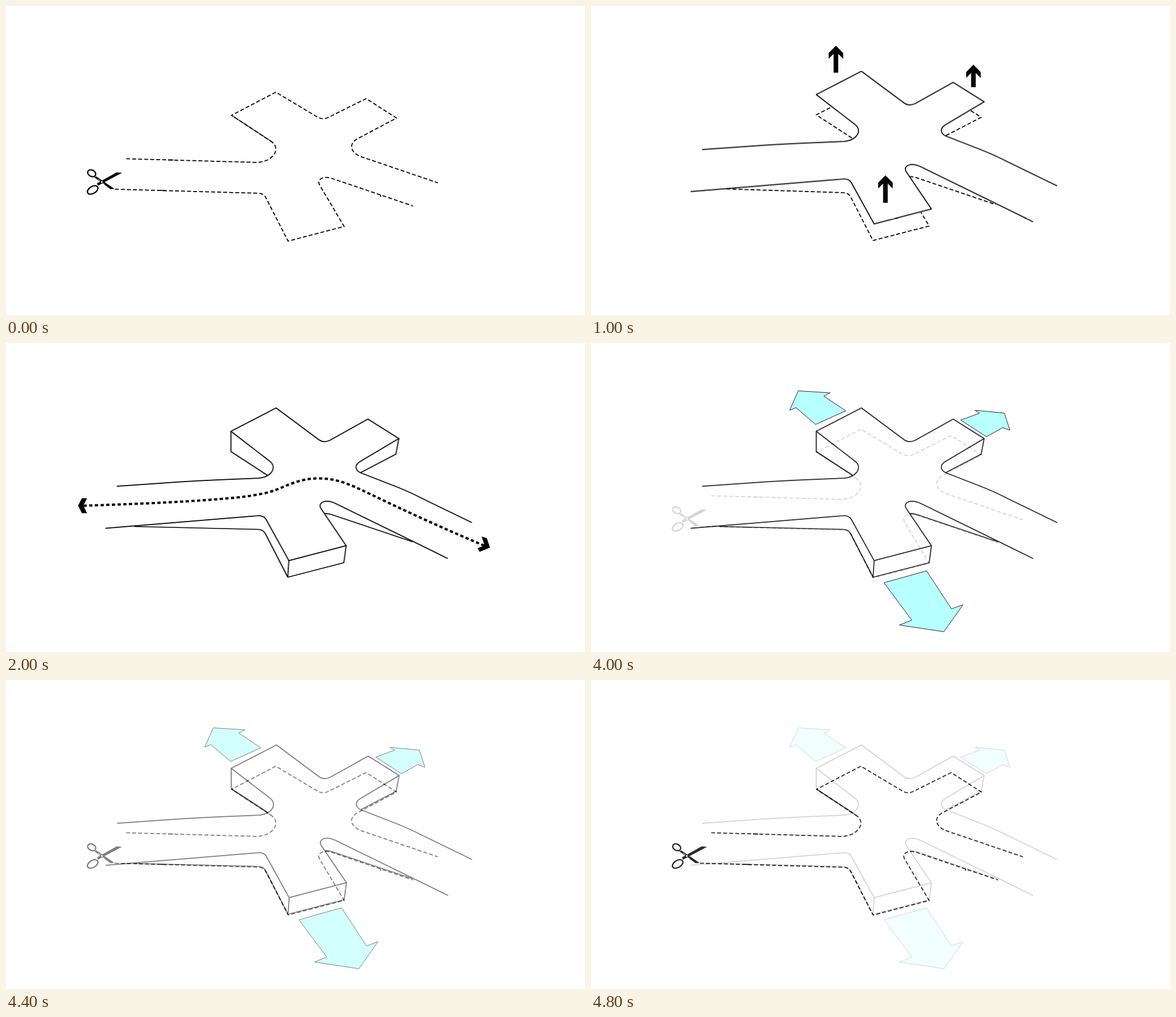
Animation, 1000 px wide and 533 px high, one loop 5000 ms. Source, as an HTML page:

```html
<!DOCTYPE html>
<html lang="en">
<head>
<meta charset="utf-8">
<title>Cut, lift, connect</title>
<style>
  html, body { margin: 0; width: 100%; height: 100%; overflow: hidden; background: #fff; }
  svg { display: block; width: 100%; height: 100%; }
  .line { fill: none; stroke: #000; stroke-width: 1.75; stroke-linejoin: round; }
  .dash { stroke-dasharray: 6.8 3.6; }
  .flow path { fill: #aff; stroke: #000; stroke-width: 1; }
  .route { fill: none; stroke: #000; stroke-width: 4; stroke-dasharray: 5.6 4.2; }

  .cut, .deck, .push, .side, .path, .flow { animation: 5s step-end infinite; }
  .cut { animation-name: cut; }
  .deck { animation-name: deck; }
  .push { animation-name: push; }
  .side { animation-name: side; }
  .path { animation-name: path; }
  .flow { animation-name: flow; }

  @keyframes cut {
    0% { opacity: 1; }
    20% { opacity: 0; }
    80% { opacity: .1667; }
    84% { opacity: .3333; }
    88% { opacity: .5; }
    92% { opacity: .6667; }
    96%, 100% { opacity: .8333; }
  }
  @keyframes deck {
    0% { opacity: 0; transform: none; }
    20% { opacity: 1; transform: translate(0, .5px); }
    40% { opacity: 1; transform: translate(-.5px, 0); }
    60%, 100% { opacity: 1; transform: none; }
  }
  @keyframes push { 0% { opacity: 0; } 20% { opacity: 1; } 40%, 100% { opacity: 0; } }
  @keyframes side {
    0% { opacity: 0; transform: none; }
    40% { opacity: 1; transform: translate(-.5px, 0); }
    60%, 100% { opacity: 1; transform: none; }
  }
  @keyframes path { 0% { opacity: 0; } 40% { opacity: 1; } 60%, 100% { opacity: 0; } }
  @keyframes flow { 0% { opacity: 0; } 60%, 100% { opacity: 1; } }
</style>
</head>
<body>
<svg viewBox="0 0 1000 533" preserveAspectRatio="none">
  <rect width="1000" height="533" fill="#fff"/>

  <!-- raised deck -->
  <g class="deck line">
    <path d="M192 247.2L300 239.7Q350 236.5 437 233.2C452 232 462 223.5 462 214.5C462 210 459.5 206.5 455.5 203.5L389 152.3L467 112L539 165.5Q548.500 173.500 560 167.800L625.500 131.200L679 164.700L612 204.500C602 210.500 603.500 219 612 223.500L675 248Q700 258 720 268.500L805 309.700"/>
    <path d="M172 319.700L435 298C443 297.500 447 299.500 449.500 304L489 375.300L588 349.700L544.500 285.500C540 278 546 272.800 555 272.800C561 272.800 565 274.500 569 276.500L763.500 371.700"/>
  </g>

  <!-- lifting arrows over the old outline -->
  <g class="push">
    <g class="line dash">
      <path d="M413 175.500L389 187.700L451 228"/>
      <path d="M656 180.500L674 192L613 223.500"/>
      <path d="M234 315.500L436 322C443.500 322.500 446.500 325.500 448.500 329.500L487 404.500L584 379.500L570 356"/>
      <path d="M550 294.500C557 294 561 296 566 297.500L699 342.500"/>
    </g>
    <path d="M423 68.500L435.500 81V91L427 82.500V115H419V82.500L410.500 91V81Z"/>
    <path d="M660.500 101.300L673 114V124L664.500 115.500V140H656.500V115.500L648 124V114Z"/>
    <path d="M508.500 292L521 304.700V314.700L512.500 306.200V339.500H504.500V306.200L496 314.700V304.700Z"/>
  </g>

  <!-- side faces -->
  <g class="side line">
    <path d="M389 152.300V187.200L452 228.200"/>
    <path d="M679 164.700L674 191.700L613 223.500"/>
    <path d="M222 316.500L436 321.500C443.500 322 446.500 325 448.500 329L487.200 404L584 379L588 349.700M489 375.300L487.200 404"/>
    <path d="M550 294.200C557 293.700 561 295.500 566 297L703 343"/>
  </g>

  <!-- through route -->
  <g class="path">
    <path class="route" d="M134 280.700C210 278 300 275 370 269C410 266 440 262 463 254.500C485 246.500 505 234 540 233.500C575 233.500 600 247 630 261C690 290 760 322 826 349.500"/>
    <path d="M124.500 280.500L131 267.800H140L133.500 280.500L140 293.500H131Z"/>
    <path d="M821.500 334L830.500 336.500L835.800 353L818 360.300L814.500 354L826.500 349Z"/>
  </g>

  <!-- side connections -->
  <g class="flow">
    <path d="M358 82.500L413 86L402 91.500L440 117L388 140.500L354 111.500L343 116Z"/>
    <path d="M663 116L714 121L723.500 150.500L711 146L683 161.700L638.500 133L671 121Z"/>
    <path d="M506 413.500L579.500 393L622.500 458.500L642.500 451.500L609.500 498L532.500 486.500L554 478Z"/>
  </g>

  <!-- cutting pattern -->
  <g class="cut">
    <rect width="1000" height="533" fill="#fff"/>
    <g class="line dash">
      <path d="M207.500 263.500L433 269.800C452 269 466 259 466 246.500C466 240 462 236.500 458 233.500L389.500 188.500L466 148.700L537 191Q546 197 556 192.500L622 159.700L674.500 193.300L606 229.500C593 237 593 251 612 259.500L746 305"/>
      <path d="M188 316L436 323C444 323.500 447 327 449 331L487.200 405.500L584 380.300L542 309.500C537 301.500 543 295.700 553 295.700C558 295.700 562 297 566 298.500L703 345"/>
      <path stroke-dashoffset="6" d="M389.500 188.500L458 233.500"/>
    </g>
    <path class="line" d="M280 265.400L289 265.700M267 318.200L276 318.500M647 326V329"/>
    <g class="scissors">
      <path d="M157 306L191 287L200.500 287.700L167 305.500L159 310Z"/>
      <path d="M152.500 295.500L156 294L187.500 315.500L180.500 316Z"/>
      <g fill="none" stroke="#000" stroke-width="2.300">
        <ellipse cx="148" cy="288.500" rx="7.300" ry="5.500" transform="rotate(28 148 288.500)"/>
        <ellipse cx="149.700" cy="317.300" rx="10" ry="6" transform="rotate(-32 149.700 317.300)"/>
      </g>
      <circle cx="165.500" cy="303.500" r="1.500" fill="#fff"/>
      <path d="M159 298.500L163 301.500M167.500 306L170 308" stroke="#fff"/>
    </g>
  </g>
</svg>
</body>
</html>
```
